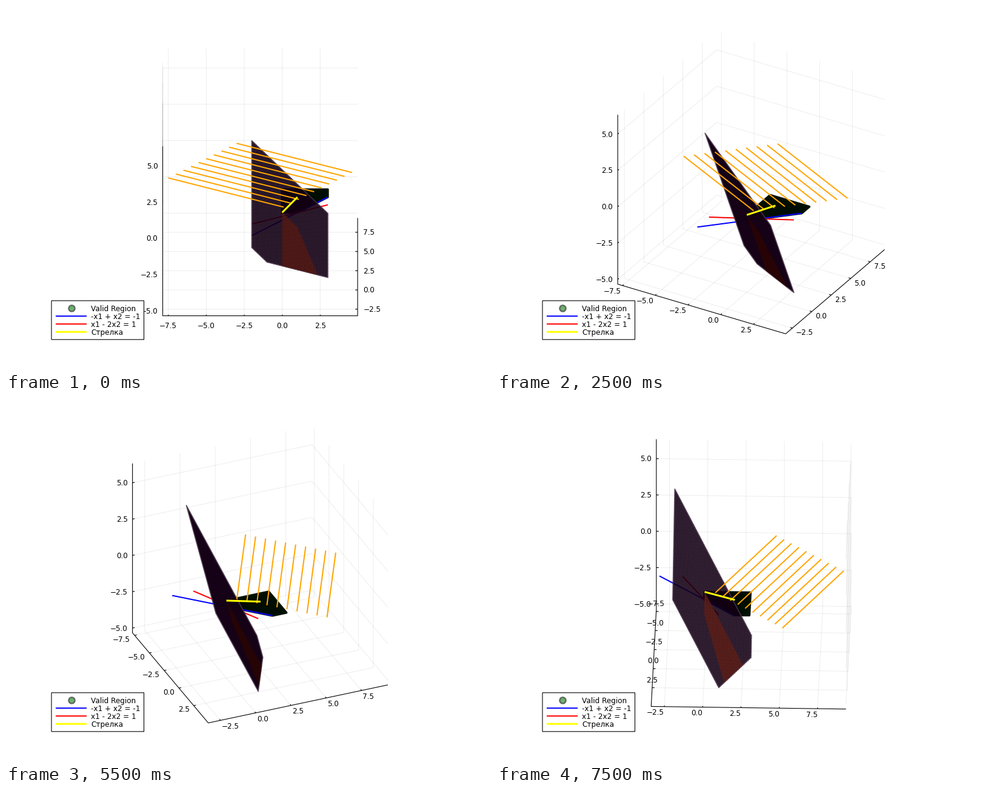
Recreate the animation shown at these times as a matplotlib script. Size 800 px wide and 600 px high, loop 8 s.

```python
import numpy as np
import matplotlib.pyplot as plt
from matplotlib.animation import FuncAnimation
from matplotlib.collections import LineCollection

W, H, DPI = 800, 600, 100
PX = 72 / DPI
FRAMES, STEP = 16, 360 / 59
CENTER = np.array([419.25, 290.4])
WIDE, TALL = 321.5, 322.4
TILT = np.radians(30)
GAP = 9.3

plt.rcParams["font.family"] = "DejaVu Sans"
plt.rcParams["path.snap"] = False

# data limits widened by 3 % on each side
DATA = np.array([[-7.5, 4.6], [-3, 9], [-5, 6]])
PAD = 0.03 * np.ptp(DATA, axis=1)
LO, HI = DATA[:, 0] - PAD, DATA[:, 1] + PAD
TICKS = [np.arange(-7.5, 2.6, 2.5), np.arange(-2.5, 7.6, 2.5),
         np.arange(-5, 5.1, 2.5)]

REGION = [(0, 0), (0, 3), (3, 3), (3, 2), (1, 0)]
PLANE = [(-2, -2), (-2, 3), (-1, 3), (3, 1), (3, -2)]
SHADOW = [(0, 0), (0, 2.5), (7 / 3, 4 / 3), (1, 0)]

GX, GY = (g.ravel() for g in np.meshgrid(np.arange(-2, 3.01, 0.1),
                                         np.arange(-2, 3.01, 0.1)))
ON_PLANE = GX + 2 * GY <= 5.001
GX, GY = GX[ON_PLANE], GY[ON_PLANE]

fig = plt.figure(figsize=(W / DPI, H / DPI), dpi=DPI, facecolor="white")
ax = fig.add_axes([0, 0, 1, 1])


def project(points, az):
    u = (np.atleast_2d(points) - LO) / (HI - LO) - 0.5
    x, y, z = u.T
    c, s = np.cos(az), np.sin(az)
    across = x * c + y * s
    up = z * np.cos(TILT) + (y * c - x * s) * np.sin(TILT)
    return np.column_stack([CENTER[0] + WIDE * across,
                            CENTER[1] - TALL * up])


def flat(xy):
    return np.array([(x, y, 0) for x, y in xy])


def lift(xy):
    return np.array([(x, y, -x - 2 * y) for x, y in xy])


def line(xy, color, width):
    ax.plot(*np.transpose(xy), color=color, lw=width * PX, zorder=2,
            solid_capstyle="butt")


def patch(xy, color, alpha=1, edge="none", width=0):
    ax.fill(*xy.T, facecolor=color, alpha=alpha, lw=0, zorder=2)
    if width:
        ax.fill(*xy.T, facecolor="none", edgecolor=edge, lw=width * PX,
                joinstyle="round", zorder=2)


def label(x, y, text, ha="left"):
    ax.text(x, y + 4.4, text, size=12 * PX, ha=ha, va="baseline", zorder=4)


def number(v):
    return f"{v:.1f}".replace("-", "\u2212")


def corner(**at):
    return np.array([at.get(k, LO[i]) for i, k in enumerate("xyz")])


def draw_grid(az):
    # each entry: tick axis, axis held at its far side, axis the line runs on
    segs = []
    for axis, fixed, run in [(0, None, 1), (0, 1, 2), (1, None, 0),
                             (1, None, 2), (2, None, 1), (2, 1, 0)]:
        for v in TICKS[axis]:
            a = LO.copy()
            a[axis] = v
            if fixed is not None:
                a[fixed] = HI[fixed]
            b = a.copy()
            b[run] = HI[run]
            segs.append(project([a, b], az))
    ax.add_collection(LineCollection(segs, colors=(0, 0, 0, 0.07),
                                     linewidths=PX, zorder=1))


def draw_axes(az):
    back = corner(z=HI[2])
    path = [back, LO, corner(x=HI[0]), corner(x=HI[0], y=HI[1])]
    line(project(path, az), "black", 1.1)

    c, s = np.cos(az), np.sin(az)
    nx = np.array([-s / 2, c]) / np.hypot(s / 2, c) * GAP
    ny = np.array([c / 2, s]) / np.hypot(c / 2, s) * GAP
    tick = 0.012 * (HI - LO)

    for v in TICKS[0]:
        p = corner(x=v)
        ends = project([p, p + [0, tick[1], 0]], az)
        line(ends, "black", 1.1)
        x, y = ends[0]
        if az == 0:
            label(x, y + 16, number(v), "center")
        elif c < 0:
            label(x, y - 13, number(v), "center")
        else:
            label(x + nx[0], y + nx[1], number(v), "right")

    for v in TICKS[1]:
        p = corner(x=HI[0], y=v)
        ends = project([p, p - [tick[0], 0, 0]], az)
        line(ends, "black", 1.1)
        x, y = ends[0] + ny
        label(x, y, number(v), "left" if c >= 0 else "right")

    for v in TICKS[2]:
        p = corner(z=v)
        ends = project([p, p + [0, tick[1], 0]], az)
        line(ends, "black", 1.1)
        label(ends[0][0] - 8, ends[0][1], number(v), "right")


def draw_plane(az):
    # the point cloud thins out as the plane turns towards the viewer
    o, a, b = project(lift([(0, 0), (1, 0), (0, 1)]), az)
    (ux, uy), (vx, vy) = a - o, b - o
    gap = np.exp(-2000 / max(abs(ux * vy - uy * vx), 1))
    purple = (0.075, 0, 0.08)
    brown = (0.15 + 1.7 * gap, 0.01 + 0.9 * gap, 0.01 + 0.7 * gap)

    patch(project(lift(PLANE), az), purple, 1 - gap, (0.3, 0.22, 0.3, 0.8), 1.8)
    patch(project(lift(SHADOW), az), brown, 0.9)
    if gap > 0.02:
        dots = project(np.column_stack([GX, GY, -GX - 2 * GY]), az)
        ax.plot(*dots.T, "o", color=purple, ms=1.2 * PX, mew=0, alpha=0.4,
                zorder=2)


def draw_legend():
    ax.add_patch(plt.Rectangle((75, 485.8), 152.5, 64, fc="white", ec="black",
                               lw=1.1 * PX, zorder=5))
    rows = [("Valid Region", None, 0), ("-x1 + x2 = -1", "blue", 2),
            ("x1 - 2x2 = 1", "red", 2), ("Стрелка", "yellow", 3)]
    for k, (text, color, width) in enumerate(rows):
        y = 498.2 + 13 * k
        if color:
            ax.plot([82, 133], [y, y], color=color, lw=width * PX, zorder=6,
                    solid_capstyle="butt")
        else:
            ax.plot(108, y, "o", ms=10 * PX, mfc="#6cb26c", mec="#5f695f",
                    mew=2.4 * PX, zorder=6)
        ax.text(140, y + 4.4, text, size=12 * PX, va="baseline", zorder=6)


def draw(i):
    az = np.radians(STEP * i)
    ax.clear()
    ax.set(xlim=(0, W), ylim=(H, 0))
    ax.axis("off")

    draw_grid(az)
    draw_axes(az)
    patch(project(flat(REGION), az), "#000d02", 1, "#031203", 3.6)
    line(project(flat([(-2, -3), (3, 2)]), az), "blue", 2)
    line(project(flat([(-2, -1.5), (3, 1)]), az), "red", 2)
    draw_plane(az)
    for k in np.arange(0.5, 5.1, 0.5):
        line(project(flat([(k - 8, k + 4), (k - 0.4, k + 0.2)]), az),
             "orange", 2)
    line(project(flat([(0, 0), (1, 2)]), az), "yellow", 3)
    draw_legend()
    return []


anim = FuncAnimation(fig, draw, frames=FRAMES, interval=500,
                     init_func=lambda: [], repeat=True, repeat_delay=0)
plt.show()
```
